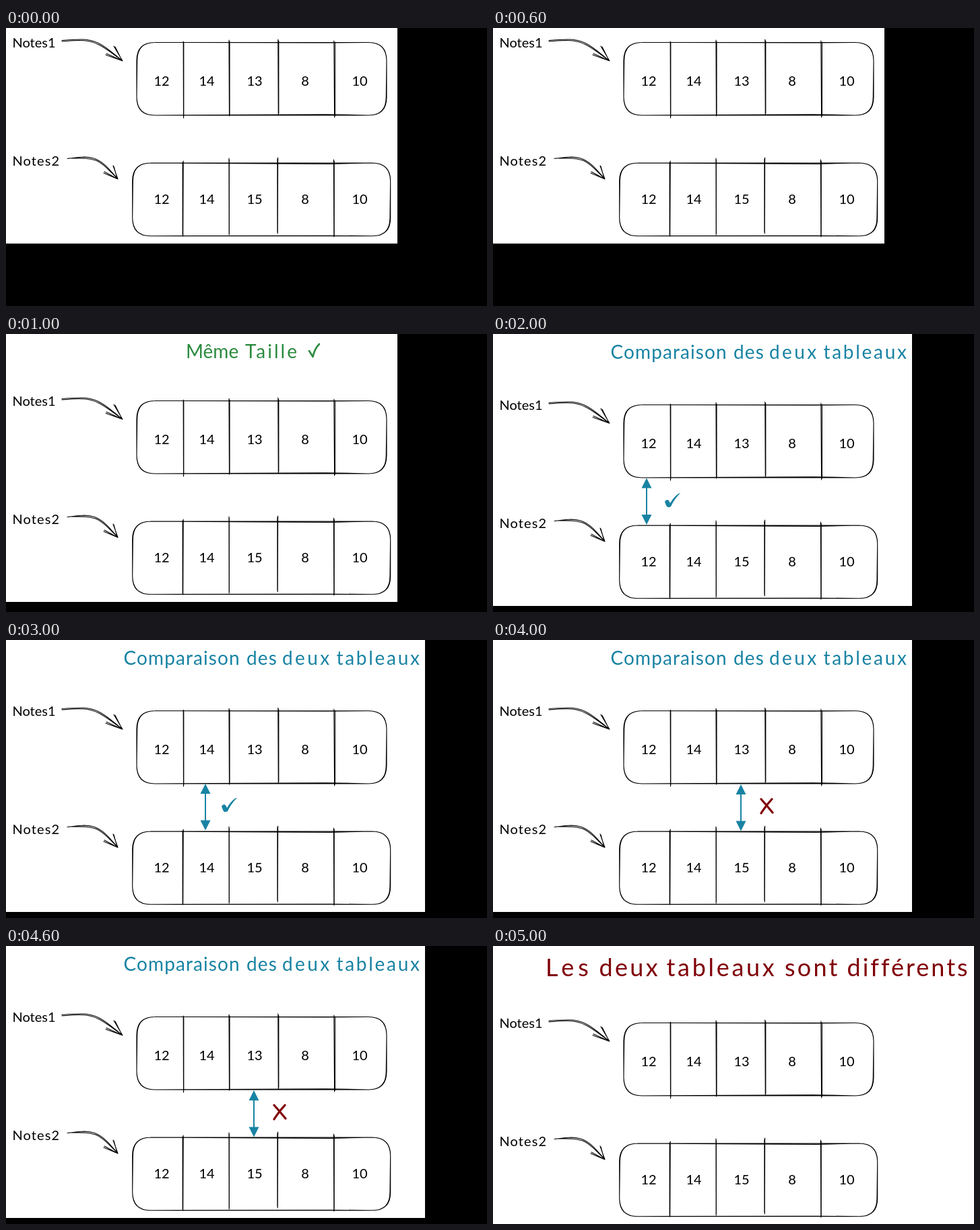
Animation, 714 px wide and 414 px high, one loop 6000 ms. Source, as an HTML page:

```html
<!DOCTYPE html>
<html lang="fr">
<head>
<meta charset="utf-8">
<title>Comparaison de tableaux</title>
<style>
  html, body { margin: 0; width: 100%; height: 100%; overflow: hidden; background: #000; }
  svg { display: block; }
  text { font: 20px Lato, "Open Sans", sans-serif; white-space: pre; }
  .number { text-anchor: middle; }
  .ink { fill: none; stroke: #000; stroke-width: 1.1; stroke-linecap: round; stroke-linejoin: round; }
</style>
</head>
<body>
<svg id="stage" width="714" height="414" viewBox="0 0 714 414"></svg>
<script>
const stage = document.getElementById("stage");
const STEP = 1000;
const GREEN = "#2b8a3e", BLUE = "#1883a3", RED = "#800008";

const ink = d => `<path class="ink" d="${d}"/>`;

const label = (text, x, y, spacing = 0) =>
  `<text x="${x}" y="${y}" letter-spacing="${spacing}">${text}</text>`;

// Each word is [text, x, letter spacing].
const heading = (words, y, size, color) =>
  `<g fill="${color}">` + words.map(([text, x, spacing]) =>
    `<text x="${x}" y="${y}" style="font-size:${size}px" letter-spacing="${spacing}">${text}</text>`
  ).join("") + "</g>";

const numbers = (values, y) => values.map((value, i) =>
  `<text class="number" x="${[231, 298, 369, 444, 525][i]}" y="${y}">${value}</text>`).join("");

// A hand-drawn rounded box: two outlines that drift slightly apart.
function box(left, top, right, bottom, topGap, bottomGap) {
  const outline = (dx, up, down) => {
    const l = left + dx, r = right - dx, t = top + up, b = bottom + down;
    return `M${left + 27} ${top}L${right - 90} ${t}L${right - 27} ${top}` +
      `Q${r} ${top} ${right} ${top + 27}L${r} ${bottom - 27}` +
      `Q${r} ${bottom} ${right - 27} ${bottom}L${right - 90} ${b}L${left + 27} ${bottom}` +
      `Q${l} ${bottom} ${left} ${bottom - 27}L${l} ${top + 27}Q${l} ${top} ${left + 27} ${top}`;
  };
  return ink(outline(0, 0, 0) + outline(.7, topGap, bottomGap));
}

// Two nearly parallel strokes per divider: [x, top, bottom, drift].
const dividers = list => ink(list.map(([x, top, bottom, drift]) =>
  `M${x} ${top}L${x + drift / 2} ${bottom}M${x + drift} ${top + 2}L${x + drift} ${bottom - 2}`).join(""));

const arrays =
  label("Notes1", 9.5, 29) +
  ink("M83 18.5C112 16 122 16 136 22C148 27 159 38 173 49" +
      "M83 20C112 17 124 18 138 25C150 31 160 40 172 48" +
      "M173 49L148 40M173 49L149 38M173 49L160 27M172 48L162 28") +
  box(194, 21.5, 565, 130, .4, -1.3) +
  dividers([[263.2, 20, 134, .6], [331, 18, 131, 1], [403.8, 17, 129, 1], [486.8, 19, 133, 1.6]]) +
  numbers([12, 14, 13, 8, 10], 86) +
  label("Notes2", 9.5, 205, 1.1) +
  ink("M91 194.5C108 192 119 191 130 194C145 199 154 211 166 225" +
      "M93 194C110 194 121 193 133 197C145 202 155 214 165 224" +
      "M166 225L145 216M166 225L146 214M166 225L159 205M165 224L160 206") +
  box(187.7, 201, 570.7, 309.7, 1.4, -.5) +
  dividers([[263.2, 198, 310, -1], [331, 194, 308, .4], [403.6, 193, 306, -.7], [486.4, 196, 311, .8]]) +
  numbers([12, 14, 15, 8, 10], 262);

const doubleArrow = (x, y) =>
  `<path d="M${x} ${y + 12}V${y + 58}" stroke="${BLUE}" stroke-width="2"/>
   <path d="M${x} ${y}l7.5 15h-15zM${x} ${y + 69.5}l7.5 -15h-15z" fill="${BLUE}"/>`;

const heavyCheck = (x, y) =>
  `<path transform="translate(${x} ${y})" fill="${BLUE}"
    d="M0 13Q1 10 4 10Q6 10 8 15Q13 6 20 1Q22 0 23 0Q14 9 9 20Q8 21 5 21Q3 21 2 18Z"/>`;

const cross =
  `<path d="M398 237Q406 246 415 257M414 237Q404 248 398 258" fill="none"
    stroke="${RED}" stroke-width="3.2" stroke-linecap="round"/>`;

const thinCheck =
  `<path d="M450 25L455.5 34Q458 22 465 15" fill="none" stroke="${GREEN}"
    stroke-width="2.6" stroke-linecap="round" stroke-linejoin="round"/>`;

const scene = (width, height, shift, extra = "") =>
  `<g visibility="hidden"><rect width="${width}" height="${height}" fill="#fff"/>
   <g transform="translate(0 ${shift})">${arrays}</g>${extra}</g>`;

const sameSize = heading([["Même", 267, 0], ["Taille", 355, 3]], 36, 28, GREEN) + thinCheck;

const comparing = heading([["Comparaison", 174.5, 1.1], ["des", 357, 1.1],
  ["deux", 410, 3.4], ["tableaux", 490.5, 2.7]], 36.5, 28, BLUE);

const different = heading([["Les", 78, 6], ["deux", 157.5, 3.3], ["tableaux", 257.5, 3.7],
  ["sont", 433, 3.2], ["différents", 525.5, 3]], 44.5, 36, RED);

const compare = (x, y, result) => scene(622, 405, 84, comparing + doubleArrow(x, y) + result);

stage.innerHTML = [
  scene(581, 321, 0),
  scene(581, 399, 78, sameSize),
  compare(228, 214.5, heavyCheck(255, 237)),
  compare(296, 214, heavyCheck(320, 235)),
  compare(368, 215, cross),
  scene(714, 414, 93, different)
].join("");

const scenes = [...stage.children];

function draw() {
  const current = Math.floor(performance.now() / STEP) % scenes.length;
  scenes.forEach((group, i) => group.setAttribute("visibility", i === current ? "visible" : "hidden"));
  requestAnimationFrame(draw);
}
draw();
</script>
</body>
</html>
```
